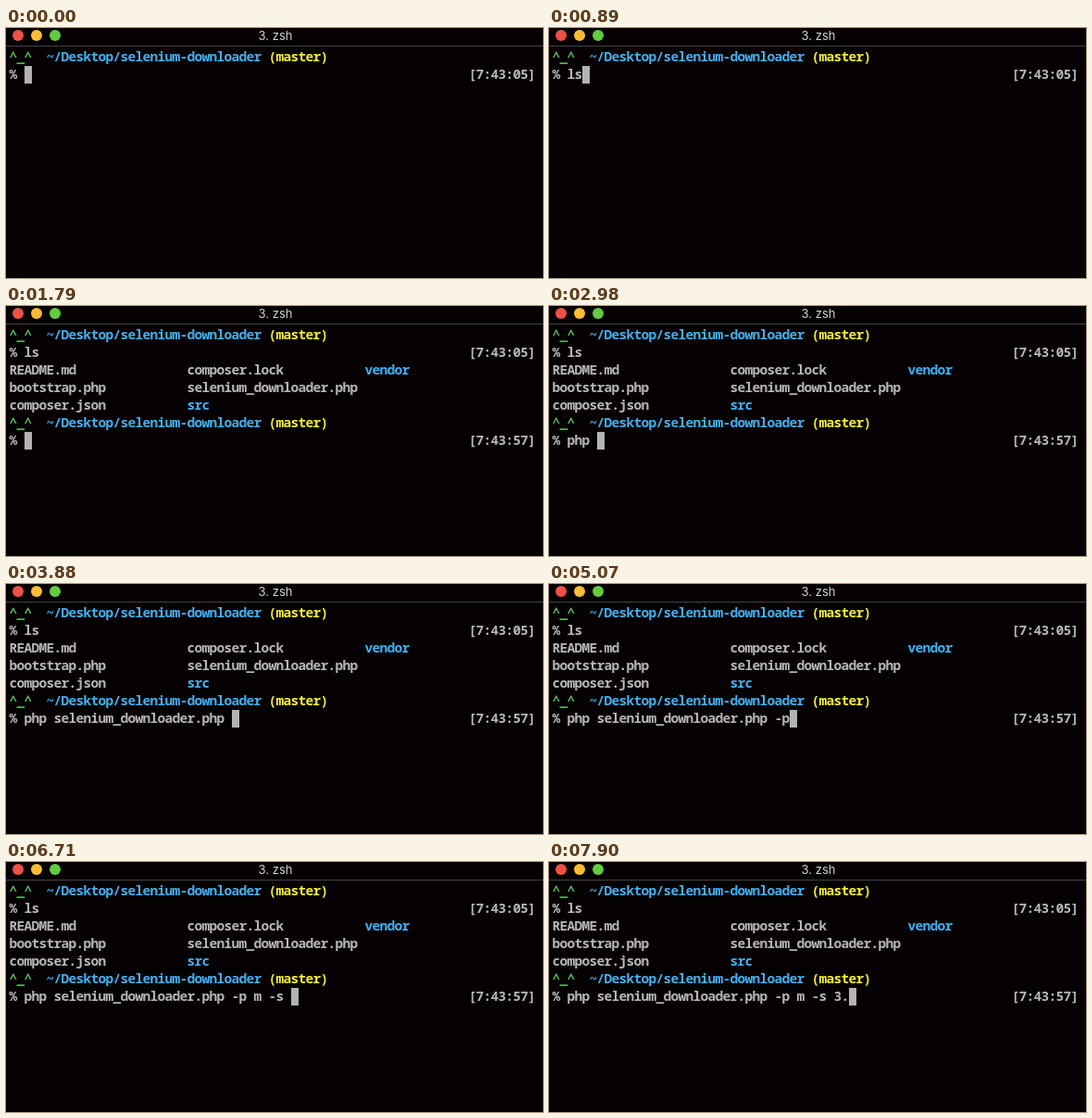
Write an HTML page that moves like this. It is 580x270 px and loops after 8 s.

```html
<!DOCTYPE html>
<html lang="en">
<head>
<meta charset="utf-8">
<title>Terminal</title>
<style>
  html, body { margin: 0; width: 100%; height: 100%; overflow: hidden; background: #050001; }
  #bar { position: absolute; width: 580px; height: 19px; border-bottom: 1px solid #454345; }
  #bar i { position: absolute; top: 2px; width: 12px; height: 12px; border-radius: 50%; }
  #bar span { position: absolute; left: 241px; width: 100px; text-align: center;
    font: 13px/17px Inter, sans-serif; color: #d4d2d3; }
  /* Glyphs slightly larger than their 8px cells, as in a tightly set terminal. */
  #screen { position: absolute; left: 3.5px; top: 21px; margin: 0; color: #b8b5b6;
    font: 600 14.5px/19px "Noto Sans Mono", "DejaVu Sans Mono", monospace;
    letter-spacing: calc(8px - 0.6em); font-variant-ligatures: none; }
  #cursor { position: absolute; width: 8px; height: 19px; background: #b5b2b3; }
  .green { color: #55b25c; }
  .blue { color: #43b0f1; }
  .yellow { color: #f5ed37; }
</style>
</head>
<body>
<div id="bar">
  <i style="left:7px;background:#ee5048"></i>
  <i style="left:27px;background:#fdbd33"></i>
  <i style="left:47px;background:#63cb40"></i>
  <span>3. zsh</span>
</div>
<pre id="screen"></pre>
<div id="cursor"></div>
<script>
const LOOP = 8000, CELL = 8, ROW = 19, LEFT = 4, TOP = 22;
const LIST_AT = 1490, PROMPT_AT = 1790;

// Each entry: time in ms, text typed at that moment.
const firstKeys = [[890, 'ls']];
const secondKeys = [
  [2690, 'p'], [2840, 'h'], [2980, 'p '], [3430, 's'], [3580, 'e'],
  [3880, 'lenium_downloader.php '],
  [4930, '-'], [5070, 'p'], [5220, ' '], [5520, 'm'], [5810, ' '],
  [6410, '-'], [6560, 's'], [6710, ' '], [7450, '3'], [7900, '.']
];

const paint = (color, text) => `<span class="${color}">${text}</span>`;
const header = paint('green', '^_^') + '  ' +
  paint('blue', '~/Desktop/selenium-downloader') + ' ' + paint('yellow', '(master)');
const listing = [
  'README.md'.padEnd(24) + 'composer.lock'.padEnd(24) + paint('blue', 'vendor'),
  'bootstrap.php'.padEnd(24) + 'selenium_downloader.php',
  'composer.json'.padEnd(24) + paint('blue', 'src')
];
const typed = (keys, t) => keys.filter(([at]) => at <= t).map(([, text]) => text).join('');
const commandLine = (text, clock) => ('% ' + text).padEnd(62) + `[${clock}]`;

const screen = document.getElementById('screen');
const cursor = document.getElementById('cursor');
let shown = '';

function render(t) {
  const first = typed(firstKeys, t), second = typed(secondKeys, t);
  const lines = [header, commandLine(first, '7:43:05')];
  let row = 1, col = 2 + first.length;
  if (t >= LIST_AT) {
    lines.push(...listing);
    row = 5;
    col = 0;
  }
  if (t >= PROMPT_AT) {
    lines.push(header, commandLine(second, '7:43:57'));
    row = 6;
    col = 2 + second.length;
  }
  const html = lines.join('\n');
  if (html !== shown) screen.innerHTML = shown = html;
  cursor.style.left = LEFT + col * CELL + 'px';
  cursor.style.top = TOP + row * ROW + 'px';
}

const start = performance.now();
function tick() {
  render((performance.now() - start) % LOOP);
  requestAnimationFrame(tick);
}
tick();
</script>
</body>
</html>
```
